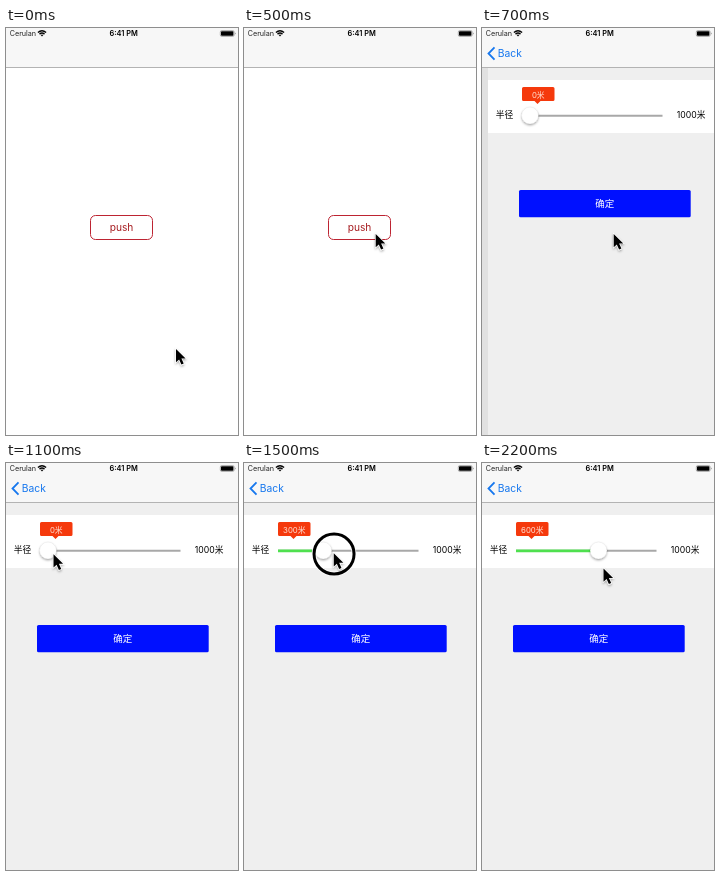
An HTML page for the animation above (2.3 s loop, 232x407 px).

```html
<!DOCTYPE html>
<html lang="zh-CN">
<head>
<meta charset="utf-8">
<title>Radius slider</title>
<style>
  html, body { margin: 0; width: 100%; height: 100%; overflow: hidden; background: #fff; }
  svg { display: block; width: 100%; height: 100%; }
  text { font-family: Inter, "Noto Sans CJK SC", "Noto Sans CJK", sans-serif; }
  .mid { text-anchor: middle; }
</style>
</head>
<body>
<svg viewBox="0 0 232 407">
  <defs>
    <filter id="soft" x="-50%" y="-50%" width="200%" height="200%">
      <feDropShadow dx="0" dy="1.3" stdDeviation="1.2" flood-opacity=".35"/>
    </filter>
  </defs>

  <rect width="232" height="407" fill="#fff"/>
  <g id="home">
    <rect x="84.5" y="187.5" width="62" height="24" rx="5" fill="#fff" stroke="#bd2432"/>
    <text class="mid" x="115.5" y="203" font-size="10.2" fill="#a61c20">push</text>
  </g>
  <rect id="dim" y="40" width="232" height="367"/>

  <g id="detail">
    <rect y="40" width="232" height="367" fill="#efefef"/>
    <rect y="52" width="232" height="53" fill="#fff"/>
    <text x="7.7" y="89.5" font-size="8.8">半径</text>
    <text x="188.7" y="89.5" font-size="8.7">1000米</text>
    <path d="M34 87.8H174.5" stroke="#a8a8a8" stroke-width="2"/>
    <path id="filled" stroke="#4fe04f" stroke-width="2.8"/>
    <circle id="thumb" cy="87.5" r="8.4" fill="#fff" stroke="#000" stroke-opacity=".12" stroke-width=".4" filter="url(#soft)"/>
    <path d="M35.5 59H65Q66.5 59 66.5 60.5V71.5Q66.5 73 65 73H52.5L49.5 76L46.5 73H35.5Q34 73 34 71.5V60.5Q34 59 35.5 59Z" fill="#f5390c"/>
    <text id="value" class="mid" x="50.3" y="70" font-size="7.8" fill="#ffe4d8"></text>
    <rect x="31" y="162" width="171.7" height="27.3" rx="1.6" fill="#0010ff"/>
    <text class="mid" x="116.8" y="179.2" font-size="9.5" fill="#fff">确定</text>
  </g>

  <rect width="232" height="39" fill="#f7f7f7"/>
  <path d="M0 39.5H232" stroke="#b3b3b3"/>
  <g id="back">
    <path d="M12.5 19.3L6.5 25.5L12.5 31.7" fill="none" stroke="#1677ee" stroke-width="1.8"/>
    <text x="15.8" y="29.2" font-size="10.3" fill="#1677ee">Back</text>
  </g>
  <text x="3.7" y="8.2" font-size="7.2" fill="#222">Cerulan</text>
  <text class="mid" x="117.7" y="8.2" font-size="7.4" font-weight="600">6:41 PM</text>
  <g fill="none" stroke="#000" stroke-width="1.4">
    <path d="M31.9 4.5Q36 .9 40.1 4.5M33.5 6.1Q36 4 38.5 6.1"/>
    <path d="M34.7 7L36 8.5L37.3 7Q36 6 34.7 7Z" fill="#000" stroke="none"/>
  </g>
  <rect x="214.3" y="2.6" width="13.8" height="5.8" rx="1.4" fill="#fff" stroke="#777" stroke-width=".6"/>
  <rect x="215" y="3.3" width="12.4" height="4.4" rx=".7"/>
  <path d="M229 4.4Q230.4 5.5 229 6.6Z" fill="#777"/>

  <g id="ring" fill="none">
    <circle r="20" stroke="#fff" stroke-width="4.6"/>
    <circle r="20" stroke="#000" stroke-width="3"/>
  </g>
  <path id="cursor" d="M0 0V13.2L3.1 10.4L5.4 15.6L7.7 14.6L5.4 9.5H9.6Z" stroke="#fff" stroke-width="1.2" paint-order="stroke" filter="url(#soft)"/>
</svg>

<script>
const LOOP = 2300, STEP = 100;
const $ = id => document.getElementById(id);
const move = (el, x, y = 0) => el.setAttribute("transform", `translate(${x} ${y})`);
const smooth = u => u * u * (3 - 2 * u);

// Each key: time, then values; hold where neighbours are equal.
const cursorKeys = [
  [0, 170, 321], [400, 131.7, 206], [700, 131.7, 206],
  [1100, 47.5, 91.3], [1200, 51, 91]
];
const releaseKeys = [[1900, 121, 90], [2000, 121, 90], [2200, 121.5, 105.5]];
const valueKeys = [[1200, 0], [1500, 300], [1700, 500], [1800, 550], [1900, 600]];

function sample(keys, t, ease = u => u) {
  if (t <= keys[0][0]) return keys[0].slice(1);
  const i = keys.findIndex(k => k[0] >= t);
  if (i < 0) return keys[keys.length - 1].slice(1);
  const a = keys[i - 1], b = keys[i];
  const u = ease((t - a[0]) / (b[0] - a[0]));
  return a.slice(1).map((v, n) => v + (b[n + 1] - v) * u);
}

function slideOffset(t) {
  if (t < 600) return 232;
  return t < 800 ? 42 * Math.exp(-(t - 600) / 51.4) : 0;
}

function cursorAt(t, value) {
  if (t <= 1200) return sample(cursorKeys, t, smooth);
  if (t < 1900) return [53 + value * .1225, 90.3];
  return sample(releaseKeys, t, smooth);
}

function draw(t) {
  const offset = slideOffset(t), progress = 1 - offset / 232;
  move($("detail"), offset);
  move($("home"), -70 * progress);
  $("dim").setAttribute("opacity", .12 * progress);
  $("back").setAttribute("opacity", t < 600 ? 0 : Math.min(1, progress * progress * 1.1));

  const [value] = sample(valueKeys, t);
  const thumbX = 42 + value * .1242;
  $("thumb").setAttribute("cx", thumbX);
  $("filled").setAttribute("d", `M34 87.8H${thumbX}`);
  $("value").textContent = Math.round(value / 50) * 50 + "米";

  const [x, y] = cursorAt(t, value);
  move($("cursor"), x, y);
  move($("ring"), x + .3, y + .7);
  $("ring").setAttribute("visibility", t >= 1200 && t < 2000 ? "visible" : "hidden");
}

const start = performance.now();
function tick() {
  const t = (performance.now() - start) % LOOP;
  draw(Math.floor(t / STEP) * STEP);
  requestAnimationFrame(tick);
}
tick();
</script>
</body>
</html>
```
